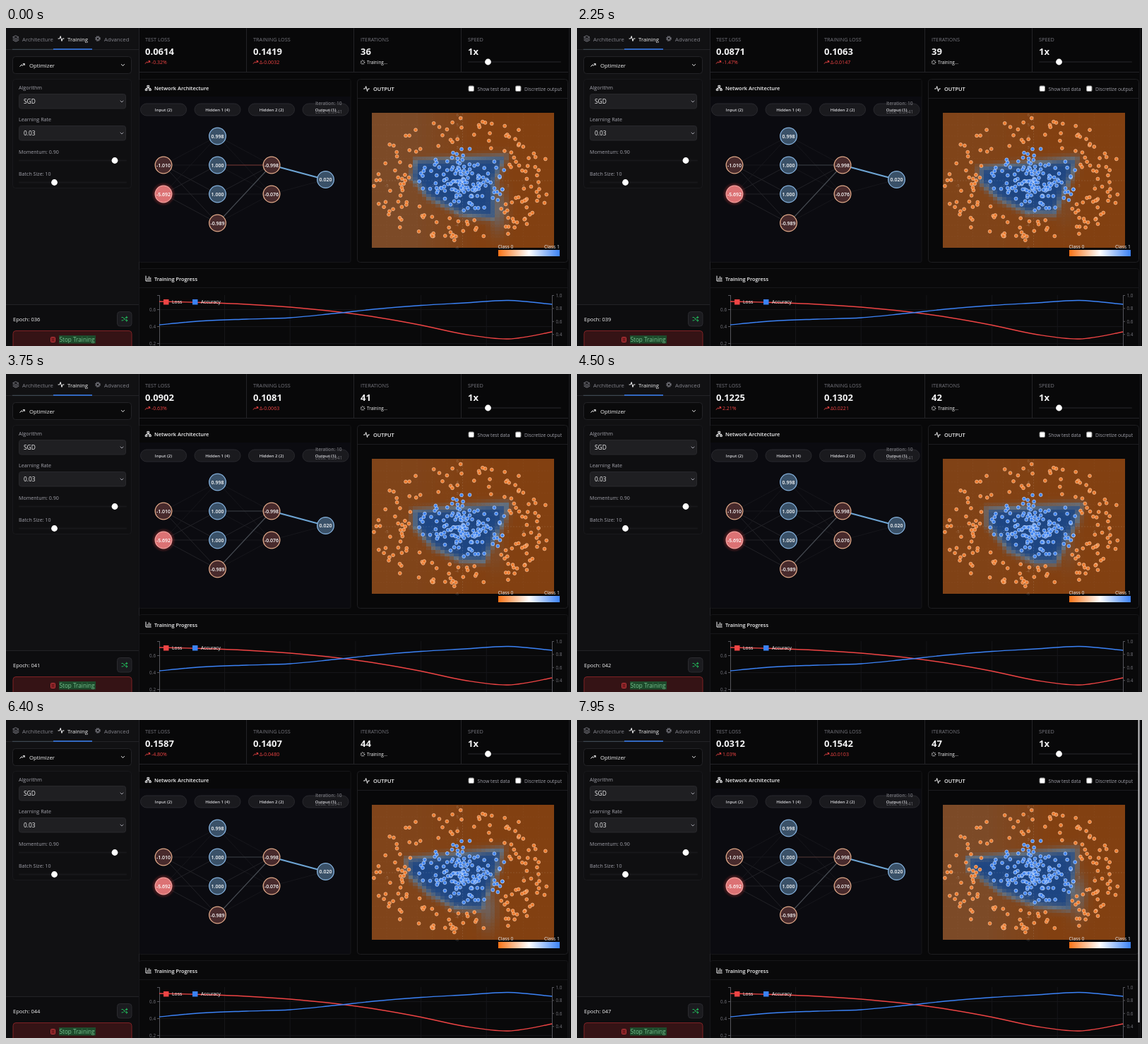
An HTML page with a canvas that plays this animation: 800 by 450 pixels, repeating every 8 s.

```html
<!DOCTYPE html>
<html lang="en">
<head>
<meta charset="utf-8">
<title>Network training</title>
<style>
html, body { margin: 0; width: 100%; height: 100%; overflow: hidden; background: #080809; }
#heat { position: absolute; left: 518px; top: 120px; width: 258px; height: 191px; image-rendering: pixelated; }
svg { position: absolute; left: 0; top: 0; width: 800px; height: 450px; }
text { font-family: "Open Sans", "Noto Sans", sans-serif; white-space: pre; }
.icon { fill: none; stroke-width: 1; stroke-linecap: round; stroke-linejoin: round; }
</style>
</head>
<body>
<canvas id="heat" width="40" height="40"></canvas>
<svg id="stage" viewBox="0 0 800 450"></svg>
<script>
const stage = document.getElementById('stage');
const heat = document.getElementById('heat').getContext('2d');
const LOOP = 8000, FIRST = 36, MORPH = 250;
const GREY = '#a1a1aa', DIM = '#77777f', WHITE = '#f4f4f5', LINE = '#232327', FAINT = '#161619';
const RED = '#ef4444', BLUE = '#3b82f6';

// ---- drawing helpers
const parts = [];
const add = markup => parts.push(markup);
const text = (x, y, size, str, fill = WHITE, extra = '') =>
  add(`<text x="${x}" y="${y}" font-size="${size}" fill="${fill}" ${extra}>${str}</text>`);
const rect = (x, y, w, h, fill, stroke = 'none', r = 0) =>
  add(`<rect x="${x}" y="${y}" width="${w}" height="${h}" rx="${r}" fill="${fill}" stroke="${stroke}"/>`);
const line = (x1, y1, x2, y2, stroke, width = 1, extra = '') =>
  add(`<line x1="${x1}" y1="${y1}" x2="${x2}" y2="${y2}" stroke="${stroke}" stroke-width="${width}" ${extra}/>`);
const circle = (x, y, r, fill, stroke = 'none', width = 1) =>
  add(`<circle cx="${x}" cy="${y}" r="${r}" fill="${fill}" stroke="${stroke}" stroke-width="${width}"/>`);
const icon = (x, y, d, stroke = WHITE) =>
  add(`<path class="icon" transform="translate(${x} ${y})" d="${d}" stroke="${stroke}"/>`);
const MID = 'text-anchor="middle"', END = 'text-anchor="end"';
const MEDIUM = 'font-weight="500"', SEMI = 'font-weight="600"';
const CHEVRON = 'M-2-1L0 1L2-1';
const TREND = 'M-3.2 1.8L-1-.6L.4 .7L3.2-1.8M1.2-1.8H3.2V.2';
const PULSE = 'M-4 0H-2L-.8-3.5L1 3.5L2.2 0H4';

function slider(x1, x2, y, thumb) {
  line(x1, y, x2, y, '#18181b', 2, 'stroke-linecap="round"');
  circle(thumb, y, 4.4, '#fff');
}

function smooth(points) {
  let d = `M${points[0]}`;
  const at = i => points[Math.max(0, Math.min(points.length - 1, i))];
  for (let i = 0; i < points.length - 1; i++) {
    const [a, b, c, e] = [at(i - 1), at(i), at(i + 1), at(i + 2)];
    d += `C${b[0] + (c[0] - a[0]) / 6} ${b[1] + (c[1] - a[1]) / 6} ` +
      `${c[0] - (e[0] - b[0]) / 6} ${c[1] - (e[1] - b[1]) / 6} ${c}`;
  }
  return d;
}

function sidebar() {
  rect(0, 0, 188, 450, '#111113');
  rect(0, 392, 188, 58, '#0d0d0f');
  line(188.5, 0, 188.5, 450, LINE);
  line(0, 30.5, 188, 30.5, LINE);
  line(9, 30.3, 67, 30.3, '#44505c');
  line(67, 30, 122, 30, BLUE, 1.3);
  icon(14, 15, 'M0-4L4-2L0 0L-4-2ZM-4 .2L0 2.2L4 .2M-4 2.2L0 4.2L4 2.2', DIM);
  text(23, 19, 7.75, 'Architecture', '#85858d');
  icon(78, 15, PULSE);
  text(87, 19, 7.75, 'Training', WHITE, MEDIUM);
  add(`<circle cx="130" cy="15" r="2.9" fill="none" stroke="${DIM}" stroke-width="1.7" stroke-dasharray="1.5 .78"/>`);
  circle(130, 15, 1.9, 'none', DIM);
  text(139, 19, 7.75, 'Advanced', '#85858d');

  rect(9.5, 40.5, 168, 24, '#0a0a0b', LINE, 4);
  icon(23, 52.5, TREND);
  text(33, 55.5, 7.8, 'Optimizer', WHITE, MEDIUM);
  icon(165.5, 52.5, CHEVRON);
  rect(9.5, 72.5, 168, 154, '#0f0f11', '#19191c', 4);
  [['Algorithm', 'SGD', 87], ['Learning Rate', '0.03', 132]].forEach(([label, value, y]) => {
    text(18, y, 7.2, label, GREY);
    rect(18.5, y + 6.5, 151, 20.5, '#1f1f22', '#28282c', 3);
    text(25, y + 20, 8.4, value, WHITE, MEDIUM);
    icon(164, y + 17, CHEVRON, GREY);
  });
  text(18, 178, 7.1, 'Momentum: 0.90', GREY);
  slider(19, 170, 187.5, 154);
  text(18, 209, 7.1, 'Batch Size: 10', GREY);
  slider(19, 170, 218.5, 68.5);

  line(0, 391.5, 188, 391.5, LINE);
  text(10, 415, 7.5, '', WHITE, `id="epoch" ${MEDIUM}`);
  rect(157.5, 401.5, 20.5, 20.5, '#1b1b1f', '#2a2a2f', 4);
  icon(168, 411.7, 'M-4-2.2H-2.4L1.6 2.2H3.8M-4 2.2H-2.4L-1.2 1M.6-1L1.6-2.2H3.8M2.5-3.5L3.9-2.2L2.5-.9M2.5 .9L3.9 2.2L2.5 3.5', '#22c55e');
  rect(10, 428.5, 168, 30, '#351315', '#7f2225', 4);
  rect(63.5, 437.5, 6, 7, '#7a1c20', '#b9383c', 1);
  rect(75, 435, 52, 11.5, '#1d4a2b');
  text(75.5, 444, 8.2, 'Stop Training', '#79c08f');
}

function stats() {
  [340.5, 492.5, 644.5].forEach(x => line(x, 0, x, 62, LINE));
  line(189, 62.5, 796, 62.5, LINE);
  [['TEST LOSS', 197, 'test'], ['TRAINING LOSS', 350, 'train'], ['ITERATIONS', 502, 'iter'], ['SPEED', 654, 'speed']]
    .forEach(([label, x, id]) => {
      text(x, 18.5, 7.3, label, DIM);
      text(x, 37.5, 13, '1x', WHITE, `id="${id}" font-weight="700"`);
    });
  icon(200.5, 48.5, TREND, RED);
  text(206, 51, 7, '', RED, 'id="percent"');
  icon(353.5, 48.5, TREND, RED);
  text(359, 51, 7, '', RED, 'id="delta"');
  add(`<circle cx="505" cy="48.5" r="2.4" fill="none" stroke="${WHITE}" stroke-width="1.7" stroke-dasharray=".75 1.13"/>`);
  text(511, 51, 6.4, 'Training...', WHITE, MEDIUM);
  slider(655, 785, 48, 682.5);
}

function network() {
  rect(188.5, 72.5, 299.5, 259, '#0b0b10', FAINT, 2);
  rect(189, 73, 298.5, 24, '#080809');
  icon(201.5, 85, 'M-1.2-3.6H1.2V-1.6H-1.2ZM-3.8 1.4H-1.6V3.4H-3.8ZM1.6 1.4H3.8V3.4H1.6ZM-2.7 1.4V0H2.7V1.4M0 0V-1.6');
  text(210, 88, 7.45, 'Network Architecture', WHITE, SEMI);

  const columns = [
    ['Input (2)', 223, [['-1.010', 194], ['-5.692', 235]]],
    ['Hidden 1 (4)', 299.5, [['0.998', 153], ['1.000', 194], ['1.000', 235], ['-0.989', 276]]],
    ['Hidden 2 (2)', 376, [['-0.998', 194], ['-0.076', 235]]],
    ['Output (1)', 452.5, [['0.020', 214.5]]]
  ];
  columns.slice(1).forEach(([, x2, to], c) => {
    const [, x1, from] = columns[c];
    from.forEach(([, y1], i) => to.forEach(([, y2], j) => {
      const key = `${c}${i}${j}`;
      if (key === '200') line(x1, y1, x2, y2, '#6ea5d4', 2);
      else if (key === '130') line(x1, y1, x2, y2, '#474c53', 1.2);
      else if (key === '110') line(x1, y1, x2, y2, '#444', 1, 'id="edge"');
      else line(x1, y1, x2, y2, (c === 0 && i + j > 1) || key === '120' ? '#27282d' : '#1a1a1f', .8);
    }));
  });
  columns.forEach(([label, x, nodes]) => {
    rect(x - 32.5, 107, 65, 17, '#1a1a1e', '#29292e', 8.5);
    text(x, 117.5, 6, label, '#d8d8dc', `${MID} ${SEMI}`);
    nodes.forEach(([value, y]) => {
      const hot = value === '-5.692', negative = value[0] === '-';
      if (hot) circle(x, y, 17, 'url(#glow)');
      circle(x, y, 11.8, hot ? '#dc7274' : negative ? '#482a2c' : '#3a5168',
        hot ? '#f5a3a0' : negative ? '#e3ab8b' : '#86b3df', 1.3);
      text(x, y + 2.6, 7, value, '#fff', `${MID} ${SEMI}`);
    });
  });
  text(438, 109, 6.7, 'Iteration: 10', '#8c8c92');
  text(438, 120.5, 6.7, 'Loss: 0.3941', '#8c8c92', 'opacity=".75"');
}

function randomizer(seed) {
  return () => (seed = (seed * 16807) % 2147483647) / 2147483647;
}

function output() {
  rect(497.5, 72.5, 298, 259, 'none', '#1e1e21', 4);
  line(498, 99.5, 795, 99.5, '#1c1c20');
  icon(510.5, 86, PULSE);
  text(520, 89, 7.4, 'OUTPUT', WHITE, SEMI);
  [[655, 'Show test data'], [721.5, 'Discretize output']].forEach(([x, label]) => {
    rect(x, 82, 7.5, 7.5, '#fff', '#888', 1.5);
    text(x + 12.5, 88.5, 6.7, label, GREY);
  });

  const cx = 646.5, cy = 216, ux = 21.5, uy = 15.8;
  for (let k = -5; k <= 5; k++) {
    const style = `opacity="${k ? .025 : .1}" stroke-dasharray="2 2"`;
    line(cx + k * ux, 121, cx + k * ux, 310, '#fff', 1, style);
    line(518, cy + k * uy, 775, cy + k * uy, '#fff', 1, style);
  }
  for (let k = -6; k <= 6; k++) {
    if (k && Math.abs(k) < 6) text(cx + k * ux, 225, 6, k, '#fff', `${MID} opacity=".25"`);
    if (k) text(641, cy - k * uy + (k > 5 ? 4 : 2), 6, k, '#fff', `${END} opacity=".22"`);
  }

  const random = randomizer(4711);
  const ring = (count, inner, outer, fill, stroke) => {
    for (let i = 0; i < count; i++) {
      const r = inner + (outer - inner) * random(), a = 2 * Math.PI * random();
      circle((cx + r * ux * Math.cos(a)).toFixed(1), (cy + r * uy * Math.sin(a)).toFixed(1), 2.4, fill, stroke, .75);
    }
  };
  ring(150, 3.4, 5.9, '#ee7a2c', '#f9c49c');
  ring(145, 0, 2.9, '#3f83ef', '#c3dafc');

  rect(697, 314, 87, 9, 'url(#scale)');
  text(696.5, 312, 6.8, 'Class 0', '#e8e8ea');
  text(784, 312, 6.8, 'Class 1', '#e8e8ea', END);
}

function chart() {
  rect(188.5, 340.5, 607, 120, '#09090a', FAINT, 3);
  line(189, 367.5, 795, 367.5, FAINT);
  icon(201.5, 354.5, 'M-3.5-3.5V3.5H3.8M-1.2 1.8V-.2M1 1.8V-2.6M3.2 1.8V-1.2');
  text(210, 357.5, 7.35, 'Training Progress', WHITE, SEMI);
  for (let x = 309.5; x < 770; x += 92.7) line(x, 378, x, 450, FAINT);
  [398.5, 422.5, 446.5].forEach(y => line(217, y, 773, y, FAINT));
  line(217.5, 378, 217.5, 450, '#55555b');
  line(773.5, 378, 773.5, 450, '#55555b');
  line(214, 378.5, 217, 378.5, '#55555b');
  ['0.6', '0.4', '0.2'].forEach((label, i) => {
    const y = 398.5 + i * 24;
    line(214, y, 217, y, '#55555b');
    text(212, y + 2.3, 6.3, label, DIM, END);
  });
  ['1.0', '0.8', '0.6', '0.4'].forEach((label, i) => {
    const y = 378.5 + i * 18.4;
    line(773, y, 776, y, '#55555b');
    text(778.5, y + 2.3, 6.3, label, DIM);
  });
  const curve = (heights, stroke) => {
    const points = heights.map((y, i) => [217 + i * 61.8, y]);
    add(`<path d="${smooth(points)}" fill="none" stroke="${stroke}" stroke-width="1.4"/>`);
  };
  curve([387, 388.5, 391, 395, 401, 409.5, 420.5, 433.5, 440, 430], RED);
  curve([420, 414.5, 412, 410, 404, 397.5, 392.5, 389, 385.5, 391], BLUE);
  [[223, 'Loss', RED], [264, 'Accuracy', BLUE]].forEach(([x, label, fill]) => {
    rect(x, 384, 7.5, 7.5, fill);
    text(x + 12, 390.2, 6.8, label);
  });
}

add(`<defs>
  <linearGradient id="scale"><stop stop-color="#f97316"/><stop offset=".5" stop-color="#fff"/><stop offset="1" stop-color="${BLUE}"/></linearGradient>
  <radialGradient id="glow"><stop offset=".6" stop-color="#ef4444" stop-opacity=".4"/><stop offset="1" stop-color="#ef4444" stop-opacity="0"/></radialGradient>
</defs>`);
sidebar();
stats();
network();
output();
chart();
line(797.5, 0, 797.5, 450, '#1d1d20');
add('<rect id="scroll" x="794.5" y="0" width="2" height="428" fill="#c9c9cc"/>');
stage.innerHTML = parts.join('');
const el = id => document.getElementById(id);

// ---- training steps
const starts = [0, 650, 1400, 2100, 2800, 3500, 4250, 5000, 5750, 6500, 7200, 7950];
const testLoss = [.0614, .0983, .1302, .0871, .0548, .0902, .1225, .1416, .1587, .1633, .1651, .0312];
const trainLoss = [.1419, .1143, .1210, .1063, .1144, .1081, .1302, .1887, .1407, .1428, .1439, .1542];

// Decision region: seven outline points, then a haze spot (x, y, strength) and a left-side tint.
const CORNERS = 7, HAZE = 14;
const early = [580, 187, 706, 182, 692, 215, 692, 270, 645, 264, 598, 240, 574, 212, 696, 256, .8, .2];
const flat = [564, 201, 704, 188, 700, 208, 677, 263, 636, 262, 592, 242, 566, 218, 690, 250, .15, .02];
const kite = [574, 196, 707, 183, 701, 208, 676, 263, 638, 261, 600, 242, 573, 218, 690, 250, .2, .1];
const wide = [581, 191, 713, 185, 708, 208, 678, 268, 650, 267, 612, 250, 582, 214, 695, 245, .25, .05];
const long = [568, 197, 702, 183, 697, 208, 674, 269, 636, 266, 600, 246, 569, 219, 682, 266, .65, .08];
const deep = [582, 192, 713, 184, 700, 215, 684, 276, 660, 275, 615, 253, 583, 214, 695, 248, .5, .05];
const sharp = [553, 195, 706, 183, 706, 210, 698, 268, 650, 263, 600, 244, 556, 213, 708, 248, .75, .2];
const mix = (a, b, p) => a.map((v, i) => v + (b[i] - v) * p);
const regions = [early, mix(early, flat, .5), flat, mix(flat, kite, .4), mix(flat, kite, .8), kite,
  mix(kite, wide, .5), wide, mix(wide, long, .5), long, deep, sharp, mix(sharp, deep, .3)];

function inside(px, py, r) {
  let nearest = 1e9, sign = -1;
  for (let i = 0, j = 2 * CORNERS - 2; i < 2 * CORNERS; j = i, i += 2) {
    const ax = r[i], ay = r[i + 1], dx = r[j] - ax, dy = r[j + 1] - ay;
    const u = Math.max(0, Math.min(1, ((px - ax) * dx + (py - ay) * dy) / (dx * dx + dy * dy)));
    nearest = Math.min(nearest, Math.hypot(px - ax - u * dx, py - ay - u * dy));
    if ((ay > py) !== (r[j + 1] > py) && px < ax + dx * (py - ay) / dy) sign = -sign;
  }
  return sign * nearest;
}

const orangeTone = [130, 64, 17], blueTone = [29, 69, 130], middle = [100, 112, 126];

function paintHeat(r) {
  const [hazeX, hazeY, strength, leftTint] = r.slice(HAZE);
  const image = heat.createImageData(40, 40);
  for (let i = 0; i < 1600; i++) {
    const x = 518 + (i % 40 + .5) * 6.45, y = 120 + (Math.floor(i / 40) + .5) * 4.775;
    const haze = strength * Math.exp(-((x - hazeX) ** 2) / 160 - (y - hazeY) ** 2 / 900);
    const tint = leftTint * Math.max(0, Math.min(1, (670 - x) / 90));
    const v = Math.max(Math.tanh(inside(x, y, r) / 6), haze - 1, tint - 1);
    const tone = mix(middle, v < 0 ? orangeTone : blueTone, Math.abs(v));
    image.data.set([...tone, 255], i * 4);
  }
  heat.putImageData(image, 0, 0);
}

function render(t) {
  const k = starts.findLastIndex(start => t >= start);
  const delta = trainLoss[k] - (k ? trainLoss[k - 1] : .1451);
  el('test').textContent = testLoss[k].toFixed(4);
  el('train').textContent = trainLoss[k].toFixed(4);
  el('percent').textContent = (delta * 100).toFixed(2) + '%';
  el('delta').textContent = 'Δ' + delta.toFixed(4);
  el('iter').textContent = FIRST + k;
  el('epoch').textContent = 'Epoch: 0' + (FIRST + k);
  el('edge').setAttribute('stroke', k < 1 ? '#7d3b37' : k > 8 ? '#573a38' : '#3f4248');
  el('scroll').setAttribute('visibility', t >= 7950 ? 'visible' : 'hidden');
  const p = Math.max(0, Math.min(1, (t - starts[k]) / (k ? MORPH : 200)));
  paintHeat(mix(regions[k], regions[k + 1], p * p * (3 - 2 * p)));
}

const begin = performance.now();
function tick() {
  render((performance.now() - begin) % LOOP);
  requestAnimationFrame(tick);
}
tick();
</script>
</body>
</html>
```
